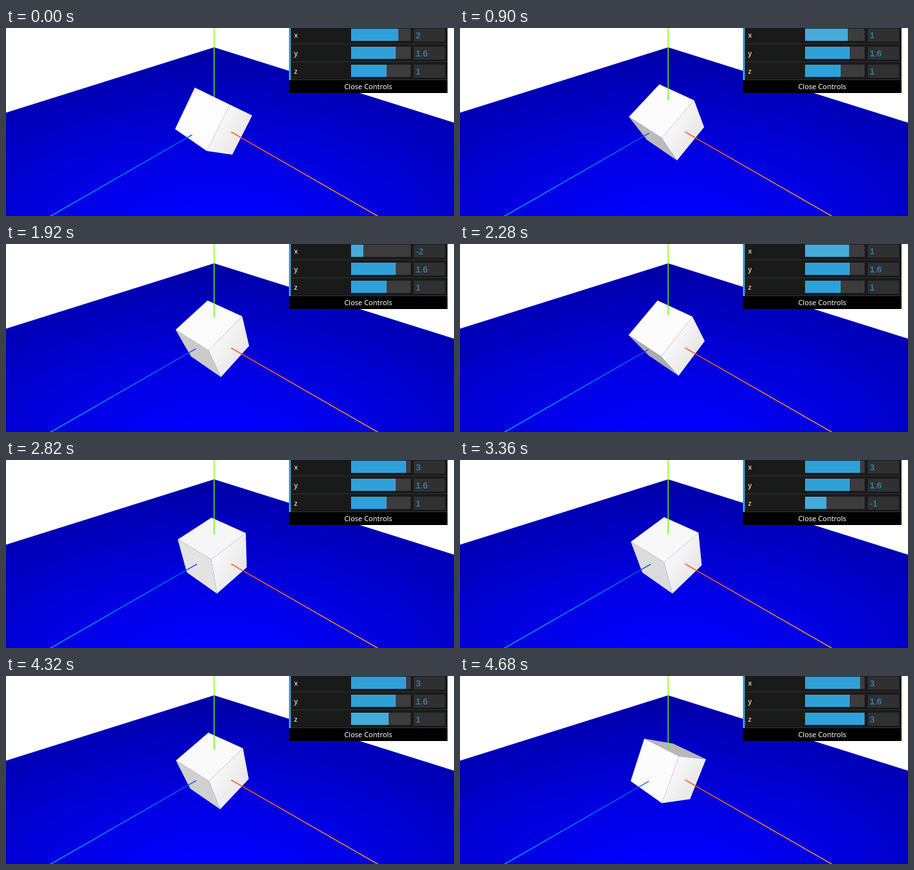
Recreate the animation shown at these times as an HTML page with a canvas. Size 692 px wide and 292 px high, loop 5.34 s.

```html
<!DOCTYPE html>
<html>
<head>
<meta charset="utf-8">
<style>
  html, body { margin: 0; width: 100%; height: 100%; overflow: hidden; background: #fff; }
  canvas { display: block; }
</style>
</head>
<body>
<canvas id="stage" width="692" height="292"></canvas>
<script>
const ctx = document.getElementById('stage').getContext('2d');
const LOOP = 5340, STEP = 60, PI = Math.PI;
const CENTER = [321.5, 146.3], FOCAL = 364, DISTANCE = 6 * Math.sqrt(3);

// Euler angles of the cube as [time, value]; y stays at a quarter turn (gimbal lock)
const xKeys = [[840, 1.835], [1200, -.82], [1380, -2.2], [1560, -2.95], [1740, -2.95],
  [1920, -1.85], [2280, 1.47], [2520, 2.52], [2640, 2.52], [2820, 2.66]];
const zKeys = [[3060, .64], [3600, -2.05], [3720, -2.19], [3960, -2.19], [4500, 2.3], [4680, PI]];

function valueAt(keys, t) {
  if (t <= keys[0][0]) return keys[0][1];
  for (let i = 1; i < keys.length; i++) {
    const [t0, a] = keys[i - 1], [t1, b] = keys[i];
    if (t < t1) return a + (b - a) * (t - t0) / (t1 - t0);
  }
  return keys[keys.length - 1][1];
}

// Camera at (6, 6, 6) looking at the origin; the cube spans -1..1
function project([x, y, z]) {
  const k = FOCAL / (DISTANCE - (x + y + z) / Math.sqrt(3));
  return [CENTER[0] + k * (x - z) / Math.SQRT2,
          CENTER[1] - k * (2 * y - x - z) / Math.sqrt(6)];
}

function polygon(points, fill) {
  ctx.beginPath();
  points.forEach(p => ctx.lineTo(...p));
  ctx.closePath();
  ctx.fillStyle = fill;
  ctx.fill();
}

const gray = v => `rgb(${v},${v},${v})`;

function makeFloorPaint() {
  const paint = ctx.createRadialGradient(0, 0, 0, 0, 0, 290);
  paint.addColorStop(0, '#00f');
  paint.addColorStop(.13, '#00f');
  paint.addColorStop(.5, 'rgb(0,0,219)');
  paint.addColorStop(1, 'rgb(0,0,164)');
  return paint;
}
const floorPaint = makeFloorPaint();

function drawFloor() {
  ctx.save();
  ctx.beginPath();
  [[321.5, 30], [692, 146.9], [692, 292], [0, 292], [0, 131.5]].forEach(p => ctx.lineTo(...p));
  ctx.clip();
  ctx.translate(321.5, 318);
  ctx.scale(2, 1);
  ctx.fillStyle = floorPaint;
  ctx.fillRect(-200, -300, 400, 300);
  ctx.restore();
}

// Each axis blends from one pure channel towards a second, in linear light
const axes = {
  x: { at: t => [t, 0, 0], end: 6.8, color: g => `rgb(255,${g},0)` },
  y: { at: t => [0, t, 0], end: 4.2, color: g => `rgb(${g},255,0)` },
  z: { at: t => [0, 0, t], end: 6.8, color: g => `rgb(0,${g},255)` }
};

function drawAxis({ at, end, color }, start) {
  const from = project(at(start)), to = project(at(end));
  const span = Math.hypot(to[0] - from[0], to[1] - from[1]);
  const paint = ctx.createLinearGradient(...from, ...to);
  for (let i = 0; i <= 6; i++) {
    const t = start + (end - start) * i / 6, p = project(at(t));
    const srgb = 1.055 * (.06 * t) ** (1 / 2.4) - .055;
    const offset = Math.hypot(p[0] - from[0], p[1] - from[1]) / span;
    paint.addColorStop(Math.min(1, offset), color(Math.round(255 * srgb)));
  }
  ctx.strokeStyle = paint;
  ctx.lineWidth = 1.4;
  ctx.beginPath();
  ctx.moveTo(...from);
  ctx.lineTo(...to);
  ctx.stroke();
}

const facesCamera = a => Math.cos(a) + Math.sin(a) > 1 / 6;
const corner = (x, a) => project([x, Math.SQRT2 * Math.cos(a), Math.SQRT2 * Math.sin(a)]);

function drawCube(turn) {
  for (let i = 0; i < 4; i++) {
    const a = turn + i * PI / 2;
    if (!facesCamera(a)) continue;
    const light = .816 * Math.cos(a - PI / 4);
    const shade = Math.round(253 - 190 * Math.max(0, .85 - light) ** 2);
    polygon([corner(1, a - PI / 4), corner(1, a + PI / 4),
             corner(-1, a + PI / 4), corner(-1, a - PI / 4)], gray(shade));
  }
  const paint = ctx.createLinearGradient(318, 145, 378, 179);
  paint.addColorStop(0, gray(251));
  paint.addColorStop(1, gray(226));
  polygon([1, 3, 5, 7].map(k => corner(1, turn + k * PI / 4)), paint);
}

function drawScene(angle) {
  const quarter = PI / 2;
  const turn = angle - Math.round(angle / quarter) * quarter;
  const exit = 1 / Math.cos(turn);
  const yFront = facesCamera(turn), zFront = facesCamera(turn + quarter);
  drawFloor();
  if (!yFront) drawAxis(axes.y, exit);
  if (!zFront) drawAxis(axes.z, exit);
  drawCube(turn);
  drawAxis(axes.x, 1);
  if (yFront) drawAxis(axes.y, exit);
  if (zFront) drawAxis(axes.z, exit);
}

function rect(x, y, w, h, fill) {
  ctx.fillStyle = fill;
  ctx.fillRect(x, y, w, h);
}

function text(str, x, y, font, fill) {
  ctx.font = font;
  ctx.fillStyle = fill;
  ctx.fillText(str, x, y);
}

const LABEL = '11px "Noto Sans", sans-serif';
const NUMBER = '13.33px "Liberation Sans", Arial, sans-serif';

function drawRow(index, name, value, shown, active) {
  const y = 28 * index;
  rect(437, y - 3, 245, 27, '#1a1a1a');
  rect(437, y + 24, 245, 1, '#2c3336');
  rect(437, y - 3, 3, 28, '#2fa1d6');
  rect(533, y + 1, 92, 19, '#3c3c3c');
  rect(533, y + 1, Math.round(92 * (value + PI) / (2 * PI)), 19, active ? '#44abda' : '#2fa1d6');
  rect(630, y + 1, 48, 20, '#303030');
  text(name, 445, y + 15, LABEL, '#fff');
  text(shown, 633, y + 16, NUMBER, '#2fa1d6');
}

function drawPanel(x, z, t) {
  drawRow(0, 'x', x, String(Math.round(x)), t >= 480 && t < 2820);
  drawRow(1, 'y', PI / 2, '1.6', false);
  drawRow(2, 'z', z, String(Math.round(z)), t >= 3120 && t < 4680);
  rect(437, 81, 245, 20, '#000');
  ctx.textAlign = 'center';
  text('Close Controls', 559.5, 95, LABEL, '#fff');
  ctx.textAlign = 'left';
}

const begin = performance.now();

function draw() {
  const elapsed = (performance.now() - begin) % LOOP;
  const t = Math.floor(elapsed / STEP) * STEP;
  const x = valueAt(xKeys, t), z = valueAt(zKeys, t);
  rect(0, 0, 692, 292, '#fff');
  drawScene(x + z);
  drawPanel(x, z, t);
  requestAnimationFrame(draw);
}
draw();
</script>
</body>
</html>
```
